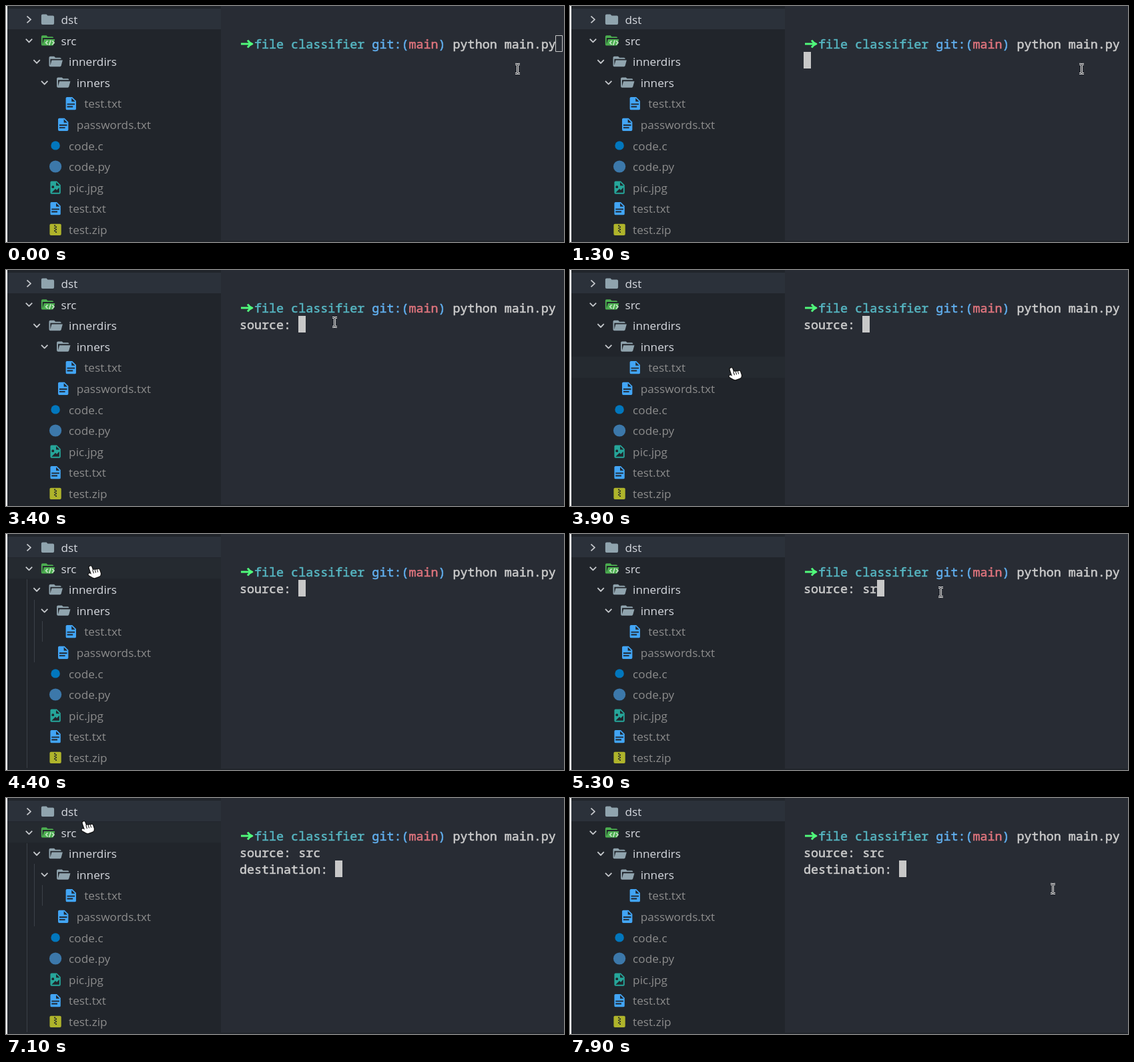
Animation of 836 by 355 pixels, one loop 8 s. Source, as an HTML page with a canvas:

```html
<!DOCTYPE html>
<html lang="en">
<head>
<meta charset="utf-8">
<title>File classifier</title>
<style>
  html, body { margin: 0; width: 100%; height: 100%; overflow: hidden; background: #21252b; }
  canvas { display: block; }
</style>
</head>
<body>
<canvas id="stage" width="836" height="355"></canvas>
<script>
const ctx = document.getElementById('stage').getContext('2d');
const LOOP = 8000, STEP = 100;
const SIDEBAR_END = 322, ROW = 31.6, INDENT = 11.6;
const CELL = 11.02, TERM_X = 350, TERM_Y = 44, LINE = 25;
const UI_FONT = '17.2px "Open Sans", "Noto Sans", sans-serif';
const TERM_FONT = '18.37px "Noto Sans Mono", "DejaVu Sans Mono", monospace';
const LIGHT = '#cccccc', GREEN = '#50fa7b', BLUE = '#61afef';

const page = 'M13 9h5.5L13 3.5V9M6 2h8l6 6v12a2 2 0 0 1-2 2H6a2 2 0 0 1-2-2V4c0-1.11.89-2 2-2';
const openFolder = 'M19 20H4a2 2 0 0 1-2-2V6a2 2 0 0 1 2-2h6l2 2h7a2 2 0 0 1 2 2H4v10l2.14-8h17.07l-2.28 8.5c-.23.87-1.01 1.5-1.93 1.5z';
const icon = (color, path) => ({ color, path: new Path2D(path) });
const disc = (color, r) => icon(color, `M${12 - r} 12a${r} ${r} 0 1 0 ${2 * r} 0a${r} ${r} 0 1 0 ${-2 * r} 0z`);
const icons = {
  closed: icon('#90a4ae', 'M10 4H4a2 2 0 0 0-2 2v12a2 2 0 0 0 2 2h16a2 2 0 0 0 2-2V8a2 2 0 0 0-2-2h-8z'),
  open: icon('#90a4ae', openFolder),
  src: icon('#4caf50', openFolder),
  txt: icon('#42a5f5', page + 'm9 16v-2H6v2h9m3-4v-2H6v2h12z'),
  jpg: icon('#26a69a', page + 'm0 18h12v-8l-4 4-2-2-6 6M8 9a2 2 0 1 0 0 4 2 2 0 1 0 0-4z'),
  zip: icon('#afb42b', 'M14 17h-2v-2h-2v-2h2v2h2v2m0-8h-2v2h2v2h-2v-2h-2V9h2V7h-2V5h2v2h2v2m5-6H5a2 2 0 0 0-2 2v14a2 2 0 0 0 2 2h14a2 2 0 0 0 2-2V5a2 2 0 0 0-2-2z'),
  c: disc('#0277bd', 7),
  py: disc('#3c78aa', 9.5)
};
const chevrons = {
  closed: new Path2D('M-3-5L2.5 0L-3 5'),
  open: new Path2D('M-4.7-2.3L0 2.5L4.7-2.3')
};
const brackets = new Path2D('M12 12.5l-3 3 3 3M19 12.5l3 3-3 3M16.8 11.5l-2.6 8');

// Leading spaces give the depth; names without an extension are folders.
const outline = `dst
src
 innerdirs
  inners
   test.txt
  passwords.txt
 code.c
 code.py
 pic.jpg
 test.txt
 test.zip`.split('\n');
const depthOf = line => line.search(/\S/);
const tree = outline.map((line, i) => {
  const name = line.trim(), depth = depthOf(line);
  const rest = outline.slice(i + 1);
  const end = rest.findIndex(other => depthOf(other) <= depth);
  const children = end < 0 ? rest.length : end;
  const folder = name.includes('.') ? null : children ? 'open' : 'closed';
  const kind = folder ? (icons[name] ? name : folder) : name.split('.')[1];
  return { name, depth, children, folder, kind };
});

// Each glide ends at (x, y); sag bends its path downwards.
const home = { x: 766, y: 94 };
const glides = [
  { from: 2100, to: 2300, x: 701, y: 112 },
  { from: 3300, to: 3400, x: 492, y: 78 },
  { from: 3400, to: 4200, x: 129, y: 58, sag: 110 },
  { from: 4500, to: 4800, x: 555, y: 87 },
  { from: 6600, to: 7100, x: 119, y: 45 },
  { from: 7100, to: 7500, x: 168, y: 33 },
  { from: 7500, to: 7900, x: 723, y: 136 }
];

const clamp = v => Math.min(1, Math.max(0, v));
const smooth = f => f * f * (3 - 2 * f);

function pointerAt(t) {
  return glides.reduce((p, g) => {
    const f = smooth(clamp((t - g.from) / (g.to - g.from)));
    return {
      x: p.x + (g.x - p.x) * f,
      y: p.y + (g.y - p.y) * f + (g.sag || 0) * Math.sin(Math.PI * f)
    };
  }, home);
}

const fade = (t, on, off) => clamp(Math.min(t - on, off - t) / 200);

function rect(color, x, y, w, h) {
  ctx.fillStyle = color;
  ctx.fillRect(x, y, w, h);
}

function stroke(path, color, width) {
  ctx.strokeStyle = color;
  ctx.lineWidth = width;
  ctx.stroke(path);
}

function at(x, y, draw) {
  ctx.save();
  ctx.translate(x, y);
  draw();
  ctx.restore();
}

function drawIcon(kind, x, y) {
  at(x, y, () => {
    ctx.scale(.96, .96);
    ctx.translate(-12, -12);
    ctx.fillStyle = icons[kind].color;
    ctx.fill(icons[kind].path, 'evenodd');
    if (kind === 'src') stroke(brackets, '#c8e6c9', 1.7);
  });
}

function drawTree(guides, pointer) {
  const hovered = Math.round((pointer.y - 20) / ROW);
  if (pointer.x < SIDEBAR_END) rect('#252a30', 2, 4 + hovered * ROW, SIDEBAR_END - 2, ROW);
  rect('#2b313a', 2, 4, SIDEBAR_END - 2, 31);
  ctx.font = UI_FONT;
  tree.forEach(({ name, depth, children, folder, kind }, i) => {
    const y = 20.3 + i * ROW, dx = depth * INDENT;
    if (folder) at(34.5 + dx, y, () => stroke(chevrons[folder], '#c5c8cc', 1.8));
    drawIcon(kind, 62.5 + dx, y);
    ctx.fillStyle = folder ? '#d7dae0' : '#8c8c8c';
    ctx.fillText(name, 82.5 + dx, y + 6.6);
    ctx.globalAlpha = guides;
    rect('#3b4048', Math.floor(31 + dx), Math.round(y + ROW / 2), 1, Math.floor(children * ROW));
    ctx.globalAlpha = 1;
  });
}

// A hairline outline gives the terminal text its medium weight.
function print(text, col, line, color = LIGHT) {
  const x = TERM_X + col * CELL, y = TERM_Y + line * LINE + 20;
  ctx.fillStyle = ctx.strokeStyle = color;
  ctx.lineWidth = .55;
  ctx.fillText(text, x, y);
  ctx.strokeText(text, x, y);
}

function block(col, line) {
  rect('#c8c8c8', Math.round(TERM_X + col * CELL), TERM_Y + line * LINE, 11, LINE);
}

const arrow = new Path2D('M352 57H368M362 51.5Q364.5 55.5 369 57Q364.5 58.5 362 62.5');
const prompt = [
  ['file classifier ', '#56b6c2'], ['git:(', BLUE], ['main', '#e0757e'], [') ', BLUE], ['python main.py', LIGHT]
];

function drawTerminal(t) {
  ctx.font = TERM_FONT;
  ctx.lineJoin = 'round';
  stroke(arrow, GREEN, 2.8);
  let col = 2;
  for (const [text, color] of prompt) {
    print(text, col, 0, color);
    col += text.length;
  }

  if (t < 100) {
    ctx.strokeStyle = '#c8c8c8';
    ctx.lineWidth = 1;
    ctx.strokeRect(823.5, 44.5, 10, 24);
  } else if (t < 1300) block(col, 0);
  else if (t < 1400) block(0, 1);
  else {
    const source = 'source: ' + 'src'.slice(0, [5100, 5300, 5600].filter(key => t >= key).length);
    print(source, 0, 1);
    if (t < 6100) block(source.length, 1);
    else {
      print('destination:', 0, 2);
      block(13, 2);
    }
  }
}

const beam = new Path2D('M-3.5-7H-1.5L0-6L1.5-7H3.5M0-6V6M-3.5 7H-1.5L0 6L1.5 7H3.5');
const hand = new Path2D('M-1.5 4L-4 1.8');
hand.roundRect(-1.8, -10, 4, 15, 2);
for (let i = 1; i < 4; i++) hand.roundRect(-1.8 + 3.2 * i, -4 + .7 * i, 4, 9, 2);
hand.roundRect(-1.8, 0, 13.2, 9, 4);
const thumb = new Path2D('M-4.5 1.5L-.5 6');
const knuckles = new Path2D('M2-3V1.5M5.2-2V1.8M8.4-1.3V2');

function drawHand() {
  ctx.rotate(-.33);
  ctx.lineCap = 'round';
  stroke(thumb, '#111', 5.5);
  stroke(hand, '#111', 2.4);
  stroke(thumb, '#fff', 3.2);
  ctx.fillStyle = '#fff';
  ctx.fill(hand);
  stroke(knuckles, '#111', 1);
}

function drawBeam() {
  ctx.translate(.5, .5);
  stroke(beam, '#e8e8e8', 3);
  stroke(beam, '#1b1d22', 1);
}

function draw(now) {
  const t = Math.floor(now % LOOP / STEP) * STEP;
  const pointer = pointerAt(t);
  const guides = Math.max(fade(t, 4100, 4800), fade(t, 6800, 7500));
  rect('#21252b', 0, 0, 836, 355);
  rect('#282c34', SIDEBAR_END, 0, 836 - SIDEBAR_END, 353);
  drawTree(guides, pointer);
  drawTerminal(t);
  rect('#fff', 0, 0, 2, 355);
  at(Math.round(pointer.x), Math.round(pointer.y), pointer.x < SIDEBAR_END ? drawHand : drawBeam);
}

let start;
function tick(now) {
  start ??= now;
  draw(now - start);
  requestAnimationFrame(tick);
}
requestAnimationFrame(tick);
</script>
</body>
</html>
```
